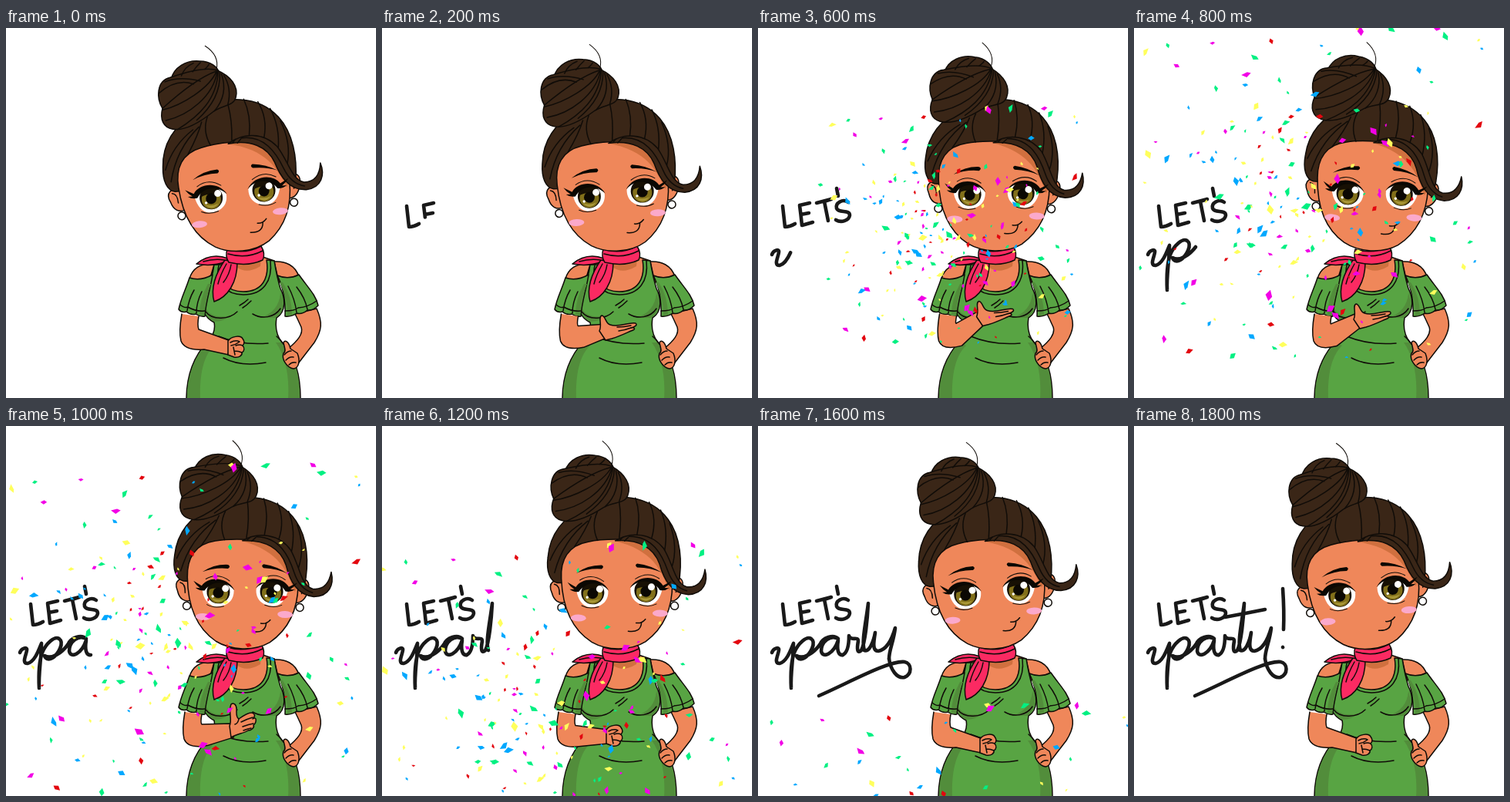
Animation of 480 by 480 pixels, one loop 2.2 s. Source, as an HTML page:

```html
<!DOCTYPE html>
<html lang="en">
<meta charset="utf-8">
<title>Let's party!</title>
<style>
html, body { margin: 0; height: 100%; overflow: hidden; background: #fff }
svg { display: block; width: 100vw; height: 100vh }
.ink { stroke: #100c08; stroke-width: 1.5; stroke-linejoin: round; stroke-linecap: round }
.line { fill: none }
.skin { fill: #ef875a }
.tan { fill: #d0703f; stroke: none }
.dress { fill: #58a443 }
.shade { fill: #528d3b; stroke: none }
.hair { fill: #3a2617 }
.scarf { fill: #fb2a62 }
.blush { fill: #fba9cb; stroke: none }
.flat { stroke: none }
#words { fill: none; stroke: #191919; stroke-width: 4.6; stroke-linecap: round; stroke-linejoin: round }
</style>
<svg viewBox="0 0 480 480">
  <defs>
    <g id="eye">
      <path class="flat" fill="#fff" d="M-21 -2C-14 -18 10 -20 20 -3C21 12 10 19-3 19C-13 18-19 9-21-2Z"/>
      <circle class="flat" r="15" fill="#171004"/>
      <circle class="flat" cy="2" r="12.5" fill="#82701a"/>
      <path class="flat" fill="#aa9838" d="M-9 8Q0 18 9 8Q0 12-9 8Z"/>
      <path class="flat" fill="#171004" d="M-14-2C-9-18 9-18 14-2Q0-8-14-2Z"/>
      <circle class="flat" cy="1" r="7" fill="#0b0803"/>
      <path class="flat" fill="#0b0803" d="M-33-13L-22-7C-14-20 11-21 21-3C9-16-9-15-18-1Q-25 0-30-4L-24-4Q-29-7-33-13Z"/>
      <path class="line" stroke-width="1" d="M-17-16Q-2-26 14-15M-14 17Q-4 22 8 18"/>
    </g>
  </defs>

  <g id="words"></g>

  <g class="ink">
    <!-- chest and shoulders -->
    <path class="skin" d="M296 298L272 308 262 330 300 350 350 335 348 302 330 296Z"/>
    <path class="tan" d="M297 303Q315 312 331 300L330 309Q312 320 299 310Z"/>
    <path class="skin" d="M270 307C255 305 243 309 238 325L262 334ZM348 303C362 302 376 308 380 323L354 330Z"/>

    <!-- arm on the hip -->
    <path class="skin" d="M403 364C411 382 410 392 400 408L380 434 366 416C378 406 386 397 383 388Q379 379 375 371Z"/>

    <path class="dress" d="M270 307C268 325 262 338 257 350C252 364 258 376 270 382C272 392 268 400 262 406C245 424 234 450 234 482L382 482C382 450 376 428 358 408C350 398 349 388 351 376C364 368 362 350 356 338C352 325 350 315 348 302L338 301C342 325 332 342 308 342C286 342 276 328 280 307Z"/>
    <path class="shade" d="M262 407C246 425 235 450 235 481L252 481C251 450 256 425 270 412ZM357 408C376 428 381 450 381 481L366 481C368 450 362 425 350 408ZM258 358C260 371 270 377 292 373Q278 383 268 380Q257 372 258 358ZM356 344C362 358 358 372 349 376L330 376Q354 368 356 344Z"/>
    <path class="line" d="M276 308C271 330 285 346 308 346C334 346 346 328 343 302M259 368C268 380 290 378 300 368M320 371C332 378 348 376 356 364M303 360Q310 356 314 352M307 363Q312 360 318 354M276 400Q305 412 340 409M282 428Q305 440 337 434M351 400Q360 408 367 420"/>

    <!-- sleeves -->
    <path class="dress" d="M238 324C233 340 227 350 224 365Q228 370 234 368Q240 373 246 371Q252 375 258 374C259 355 265 340 268 320Q252 329 238 324Z"/>
    <path class="dress" d="M352 321Q366 327 380 320C391 336 402 346 405 360Q398 367 391 366Q384 372 377 370Q370 375 362 374C363 352 359 335 352 321Z"/>
    <path class="shade" d="M262 332Q251 352 251 372L257 373Q258 352 266 332ZM355 330Q366 352 365 373L371 372Q371 348 359 330Z"/>
    <path class="line" d="M226 359Q232 364 236 362Q246 368 258 367M362 367Q374 367 379 363Q392 362 403 354M244 340Q237 352 235 367M254 342Q247 356 247 370M366 335Q375 352 377 369M377 336Q388 350 391 365"/>

    <!-- hand on the hip -->
    <path class="skin" d="M360 408C362 404 367 407 369 416L378 422C382 432 380 441 373 442C365 441 357 430 360 422C364 420 361 414 360 408Z"/>
    <path class="line" d="M361 424Q365 419 370 419M363 431Q368 426 373 427M367 437Q371 433 376 434"/>

    <path id="arm" class="skin"/>
    <g id="hands">
      <g>
        <path class="skin" d="M-2-9C2-15 14-17 17-12C20-8 19-5 17-3C20 0 19 5 16 6C17 10 12 13 6 12L-2 9Z"/>
        <path class="line" d="M1-7Q8-11 13-8Q8-4 2-3M8-3Q13-5 17-3M6 4Q12 4 16 6M5-1L7 9"/>
      </g>
      <g>
        <path class="skin" d="M-8 0C-4-8-10-18-5-20C0-20 0-9 6-8C18-4 30-12 39-10C42-8 38-5 33-4C38-5 40-2 33 0C24 4 18 7 8 10L0 12Z"/>
        <path class="line" d="M15-5Q24-5 33-7M17 0Q25-1 33-4"/>
      </g>
      <g>
        <path class="skin" d="M-4-6C0-14-6-24-2-34C1-37 6-34 5-24C5-19 6-16 8-15C15-20 24-25 27-22C30-20 28-17 26-15C32-19 31-10 27-7C29-4 24 0 20 0C14 4 6 4-2 9Z"/>
        <path class="line" d="M11-11Q19-15 26-17M13-5Q21-8 27-9M14 0Q19-2 24-3M3-8Q7-9 8-15"/>
      </g>
    </g>

    <!-- scarf -->
    <path class="scarf" d="M288 299C272 293 258 297 247 306Q268 310 285 303Z"/>
    <path class="scarf" d="M284 301C272 318 265 338 270 355C288 349 300 330 300 304Z"/>
    <path class="scarf" d="M287 287Q310 294 331 283Q337 293 333 301Q314 310 289 304Q284 296 287 287Z"/>
    <path class="line" d="M288 293Q312 300 333 289M286 306Q278 320 275 332M292 307Q290 320 282 330M256 303Q270 299 283 301"/>

    <g id="head">
      <path class="skin" d="M234 206C222 197 213 206 219 218C222 229 229 232 236 230ZM374 200C384 190 391 198 388 210C386 220 380 227 372 226Z"/>
      <path class="line" d="M222 207Q229 208 229 220M385 201Q380 206 380 214"/>
      <path class="hair" d="M226 205C216 203 211 190 213 172C215 140 235 118 262 104C300 84 345 90 368 120C385 142 388 175 383 205L370 206 300 170 232 205Z"/>
      <path class="skin" d="M231 200C229 175 239 156 265 151C285 146 325 146 344 150C364 163 370 185 375 203C376 238 364 262 342 279C322 292 292 292 272 281C244 264 233 234 231 200Z"/>
      <path class="tan" d="M298 149Q335 142 350 156C364 170 367 188 375 204L371 212C361 188 350 160 298 149Z"/>
      <path class="line" d="M216 176Q228 145 256 127M222 192Q232 150 264 124M247 158Q262 135 268 118M277 149Q268 130 276 112M305 145Q308 120 304 98M328 141Q333 115 325 93M347 145Q354 120 343 98M364 162Q369 132 358 108M374 182Q382 155 370 125"/>
      <path class="hair" d="M300 149C320 136 347 138 363 158C376 178 378 203 394 207C408 208 415 199 417 184C422 200 416 216 396 217C374 216 364 198 358 178C350 157 330 146 300 149Z"/>
      <path class="line" d="M318 143C348 142 361 166 369 187Q377 208 394 212M306 148L310 144M312 149L317 144"/>

      <!-- bun -->
      <path class="hair" d="M233 60C238 44 255 36 272 39C286 40 295 48 297 58Z"/>
      <path class="hair" d="M219 96C212 82 214 60 232 57C252 52 280 46 294 53C311 62 320 76 315 90C311 101 298 98 284 106C266 118 246 128 230 124C218 121 214 110 219 96Z"/>
      <path class="line" d="M219 96C240 80 270 60 292 54M219 98C245 94 282 75 293 54M222 112C252 108 286 86 294 54M236 125C266 110 290 90 295 55M262 115Q296 90 297 56M286 105Q306 85 299 58M304 98Q311 78 302 60M216 76Q240 58 262 68M225 62Q245 56 271 65M247 56Q252 45 264 41M262 52Q268 45 273 41M278 50Q283 46 284 44"/>
      <path class="line" stroke-width="1" d="M281 20Q299 34 293 52"/>

      <path class="flat" fill="#0b0803" d="M250 192Q265 181 283 181Q287 183 283 186Q266 185 250 192ZM361 189Q347 180 329 178Q325 180 329 183Q347 183 361 189Z"/>
      <use href="#eye" x="272" y="217"/>
      <use href="#eye" transform="translate(341 213) scale(-1 1)"/>
      <g class="flat" fill="#fff">
        <circle cx="281" cy="212" r="4.5"/><circle cx="348" cy="208" r="4.5"/>
        <circle cx="265" cy="223" r="1.7"/><circle cx="334" cy="219" r="1.7"/>
      </g>
      <ellipse class="blush" cx="254" cy="250" rx="10" ry="4.5"/>
      <ellipse class="blush" cx="360" cy="242" rx="10" ry="4.5"/>
      <path class="line" d="M319 266Q335 268 336 255M329 255Q336 256 341 250"/>
      <circle cx="232" cy="237" r="5" fill="#fff"/><circle cx="378.500" cy="232" r="5" fill="#fff"/>
    </g>
  </g>
  <g id="confetti"></g>
</svg>
<script>
const $ = id => document.getElementById(id);
const add = (parent, attrs) => {
  const el = document.createElementNS('http://www.w3.org/2000/svg', 'path');
  for (const k in attrs) el.setAttribute(k, attrs[k]);
  return parent.appendChild(el);
};
const clamp = v => Math.max(0, Math.min(1, v));

// Handwriting: start, end, path
const strokes = [
  [0, 150, 'M32 231L35 258Q41 258 48 254'],
  [100, 250, 'M67 227L54 230 55.500 242 66 240 55.500 242 57 256 71 252'],
  [200, 350, 'M76 227L95 222 86 225 91 250'],
  [300, 400, 'M102 208L104 218'],
  [400, 550, 'M117 226C110 221 100 227 102 234C105 241 119 235 119 243C118 250 108 253 101 249'],
  [550, 800, 'M18 294C20 288 28 286 27 291C26 298 20 308 28 308C37 306 42 292 46 282C46 300 42 322 43 340C42 320 44 302 47 294C52 282 63 272 69 276C76 281 68 296 60 301C55 304 51 302 50 298C60 304 74 292 80 284'],
  [800, 1000, 'M80 284C84 274 98 270 104 276C94 270 82 280 82 292C84 302 98 296 104 278C102 290 104 298 110 297'],
  [1000, 1200, 'M110 297C116 294 118 284 118 272C120 280 130 272 130 279C128 290 129 296 134 291C139 282 142 250 143 230C140 255 134 280 138 291'],
  [1200, 1400, 'M138 291C144 294 150 280 152 268C150 280 148 292 156 292C168 290 174 276 178 262C176 280 170 290 170 302'],
  [1400, 1600, 'M170 302C172 316 180 328 190 326C200 322 200 308 190 306C170 304 120 332 79 350'],
  [1600, 1700, 'M118 248Q145 243 170 238'],
  [1700, 1800, 'M193 211Q195 240 194 264'],
  [1700, 1750, 'M193 287l.1 .1']
].map(([start, end, d]) => ({ start, end, el: add($('words'), { d, pathLength: 1 }) }));

let seed = 4711;
const rnd = () => (seed = seed * 48271 % 2147483647) / 2147483647;
const bell = () => (rnd() + rnd() + rnd() - 1.5) * 2;
const colors = ['#e3060f', '#00a8ff', '#00f082', '#ffff5c', '#f200e6'];
const pieces = Array.from({ length: 210 }, () => {
  const wide = rnd() < .35;
  const r = 2.2 + 4.5 * rnd() ** 2;
  const d = `M${-r} ${-r * .5}L${r * .4} ${-r * (.2 + rnd() * .5)} ${r} ${r * .3} ${-r * .3} ${r * .6}Z`;
  return {
    x: wide ? 5 + 455 * rnd() : 215 + 85 * bell(),
    y: wide ? 430 * rnd() : 220 + 85 * bell(),
    turn: 360 * rnd(), spin: rnd() - .5,
    el: add($('confetti'), { d, fill: colors[Math.floor(rnd() * 5)] })
  };
});

// Time, elbow x, wrist x, wrist y
const armKeys = [[0, 227, 290, 415], [400, 236, 290, 371], [800, 233, 293, 378],
  [1000, 231, 294, 395], [1200, 228, 293, 403], [1400, 227, 290, 415], [2200, 227, 290, 415]];
const armAt = t => {
  const i = armKeys.findIndex(k => k[0] > t), a = armKeys[i - 1], b = armKeys[i];
  return a.map((v, n) => v + (b[n] - v) * (t - a[0]) / (b[0] - a[0]));
};

function drawArm(t) {
  const [, ex, wx, wy] = armAt(t);
  const angle = Math.atan2(wy - 403, wx - ex - 12);
  const nx = -Math.sin(angle) * 9, ny = Math.cos(angle) * 9;
  $('arm').setAttribute('d', `M${ex + 23} 374Q${ex + 21} 385 ${ex + 23} ${391 + (wy - 415) * .2}L${wx - nx} ${wy - ny}
    L${wx + nx} ${wy + ny}L${ex + 30} ${417 + (wy - 415) * .12}Q${ex + 5} 419 ${ex} 406Q${ex - 3} 394 ${ex + 1} 371`);
  const pose = t < 200 || t >= 1200 ? 0 : t < 900 ? 1 : 2;
  [...$('hands').children].forEach((hand, i) => hand.style.display = i === pose ? '' : 'none');
  $('hands').setAttribute('transform', `translate(${wx} ${wy})`);
  return [wx + 14, wy - 18];
}

function drawConfetti(t, [hx, hy]) {
  $('confetti').style.display = t >= 300 && t < 1800 ? '' : 'none';
  const burst = 1 - (1 - clamp((t - 500) / 300)) ** 3;
  const fallTime = Math.max(0, t - 800);
  const fall = fallTime < 200 ? fallTime ** 2 / 800 : 50 + (fallTime - 200) * .52;
  const drift = 1 + fallTime / 6000;
  for (const p of pieces) {
    const px = hx + (p.x - 220) * .08, py = hy + (p.y - 215) * .03;
    const x = px + (240 + (p.x - 240) * drift - px) * burst;
    const y = py + (p.y - py) * burst + fall;
    p.el.setAttribute('transform', `translate(${x} ${y}) rotate(${p.turn + p.spin * t}) scale(${.6 + .4 * burst})`);
  }
}

function draw(now) {
  const t = Math.min(1800, Math.floor(now % 2200 / 100) * 100);
  const tilt = t < 800 ? -4.9 + t * .01175 : 4.5 - (t - 800) * .0085;
  $('head').setAttribute('transform', `rotate(${tilt} 308 287)`);
  for (const s of strokes) {
    const shown = clamp((t - s.start) / (s.end - s.start));
    s.el.style.display = shown ? '' : 'none';
    s.el.setAttribute('stroke-dasharray', shown < 1 ? `${shown} 2` : 'none');
  }
  drawConfetti(t, drawArm(t));
  requestAnimationFrame(draw);
}
requestAnimationFrame(draw);
</script>
</html>
```
